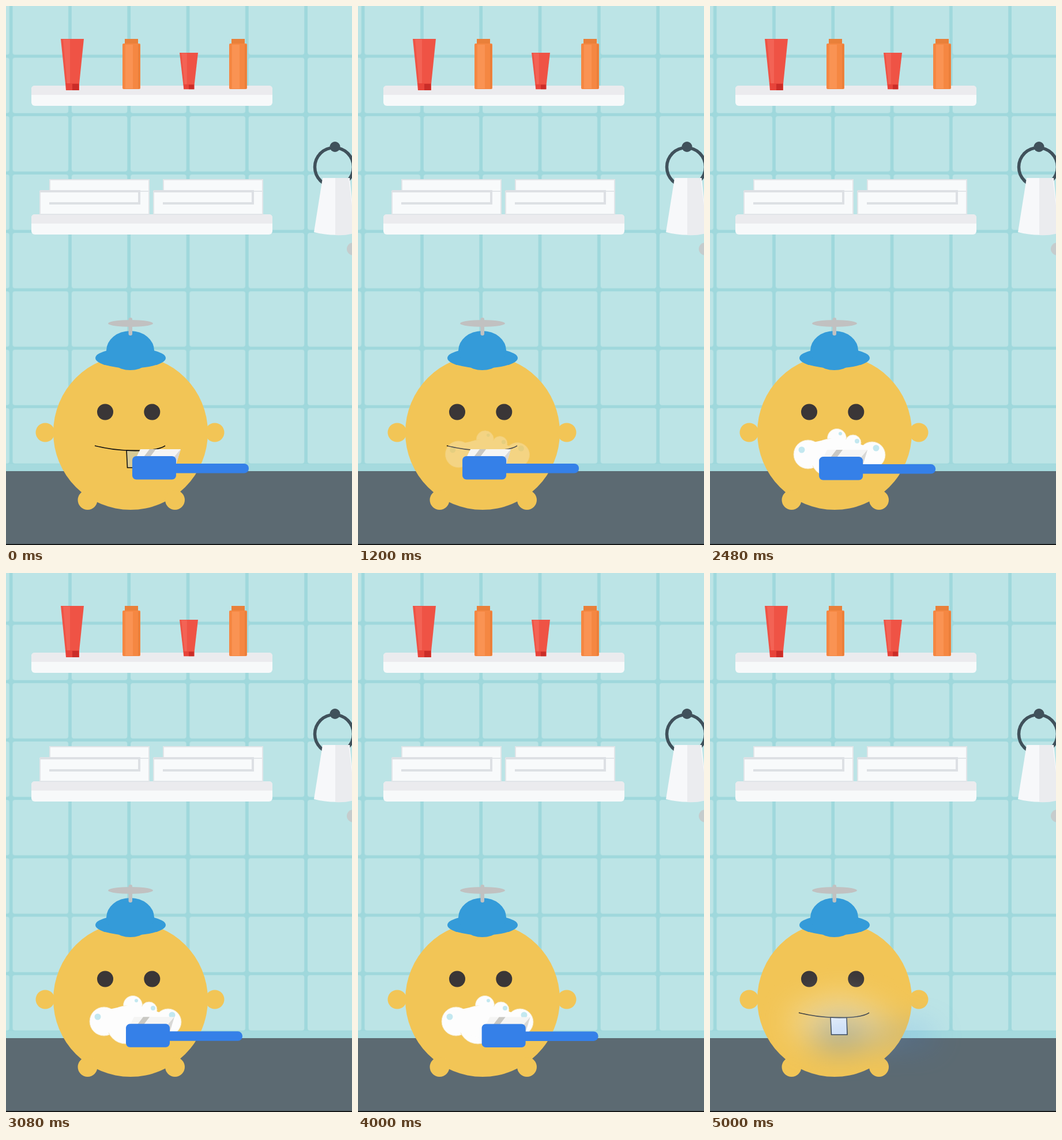
Recreate the animation shown at these times as an HTML page. Size 600 by 934 pixels, loop 5.04 s.

```html
<!DOCTYPE html>
<html lang="en">
<head>
<meta charset="utf-8">
<title>Brushing teeth</title>
<style>
  html, body { margin: 0; width: 100%; height: 100%; overflow: hidden; }
  svg { display: block; width: 600px; height: 934px; }
</style>
</head>
<body>
<svg viewBox="0 0 600 934">
  <defs>
    <pattern id="tiles" x="11.5" y="89.6" width="102.3" height="101.2" patternUnits="userSpaceOnUse">
      <rect width="103" height="102" fill="#9fd8dc"/>
      <rect width="96.6" height="96" rx="4" fill="#bce4e6"/>
    </pattern>
    <g id="shelf">
      <rect x="44" width="418" height="35" rx="6" fill="#f7f9fa"/>
      <path d="M44 16V6Q44 0 50 0H456Q462 0 462 6V16Z" fill="#ebebee"/>
    </g>
    <g id="bottle">
      <path d="M4 0H27V9H4Z" fill="#e9803a"/>
      <rect y="8" width="31" height="79" rx="2" fill="#f58742"/>
      <path d="M5 10H18V86H5Z" fill="#fa9353"/>
      <path d="M27 10H30V86H27Z" fill="#ea7f3a"/>
    </g>
    <g id="tube">
      <path d="M0 0H40L32 78H8Z" fill="#ef5345"/>
      <path d="M4 1H16V77H11Z" fill="#f36355"/>
      <path d="M8 77H32V89H9Z" fill="#e8443a"/>
      <path d="M20 78H31V89H20Z" fill="#cb2d28"/>
    </g>
    <g id="towels" stroke="#e1e5e8" stroke-width="2">
      <path d="M17 0H189V20H17Z" fill="#f8fafb"/>
      <path d="M0 20H189V60H0Z" fill="#f8fafb"/>
      <path d="M0 20H172V41H16" fill="none" stroke="#dde0e4" stroke-width="4"/>
    </g>
  </defs>

  <rect width="600" height="934" fill="url(#tiles)"/>
  <path d="M0 794H600V806H0Z" fill="#a5dade"/>
  <path d="M0 806H600V934H0Z" fill="#5c6a72"/>
  <path d="M0 932.5H600V934H0Z"/>

  <use href="#shelf" y="138"/>
  <use href="#shelf" y="361"/>
  <use href="#tube" x="95" y="57"/>
  <use href="#tube" transform="translate(301 81) scale(.8 .71)"/>
  <use href="#bottle" x="202" y="57"/>
  <use href="#bottle" x="387" y="57"/>
  <use href="#towels" x="59" y="301"/>
  <use href="#towels" x="256" y="301"/>

  <circle cx="569" cy="279" r="33.5" fill="none" stroke="#40515b" stroke-width="5.5"/>
  <circle cx="570.5" cy="244" r="9" fill="#40515b"/>
  <path d="M549 298H596L606 393Q570 401 534 392Z" fill="#f7f8fa"/>
  <path d="M571 298H594L606 393Q590 398 571 397Z" fill="#ebecef"/>
  <circle cx="602" cy="421" r="11" fill="#c5cccd"/>

  <g fill="#f2c556">
    <circle cx="216" cy="739" r="134"/>
    <circle cx="68" cy="739" r="16.5"/>
    <circle cx="362" cy="739" r="16.5"/>
    <circle cx="141.5" cy="856" r="17"/>
    <circle cx="293" cy="856" r="17"/>
  </g>
  <g fill="#349bd9">
    <ellipse cx="216" cy="610" rx="61" ry="17.5"/>
    <ellipse cx="215.5" cy="597" rx="41.5" ry="34"/>
  </g>
  <g fill="#c1c1c1">
    <ellipse cx="216" cy="550" rx="39" ry="6"/>
    <rect x="212.5" y="540" width="6.5" height="31" rx="3"/>
  </g>
  <g fill="#3a3637">
    <circle cx="172" cy="703.5" r="14"/>
    <circle cx="253.3" cy="703.5" r="14"/>
  </g>
  <g stroke="#111" stroke-width="1.6">
    <path id="tooth" d="M209 770L210.5 800H238L237 770.5Z"/>
    <path d="M154 762C178 768 200 770 216 770.5C240 771 264 770 276 762" fill="none"/>
  </g>

  <g id="gear">
    <g id="foam">
      <g fill="#fdfdfd" stroke="#f4e3b4">
        <circle cx="220" cy="749" r="16.5"/>
        <circle cx="248" cy="757" r="14"/>
        <circle cx="281" cy="778" r="23"/>
        <circle cx="170" cy="777" r="25"/>
        <circle cx="208" cy="783" r="33"/>
      </g>
      <path d="M170 758L212 749H230L250 756L280 766V798H240L208 805L172 795Z" fill="#fdfdfd"/>
      <g fill="#c3e8f0">
        <circle cx="159" cy="769" r="5.5"/>
        <circle cx="226" cy="741" r="3"/>
        <circle cx="255" cy="754" r="4"/>
        <circle cx="288" cy="766" r="5.5"/>
      </g>
    </g>
    <g id="brush">
      <path d="M7 2L14 -12H84L76 14Z" fill="#f5f5f4"/>
      <path d="M20 1L30 -12H41L31 1Z" fill="#c9c8c3"/>
      <path d="M72 2L84 -12L76 14Z" fill="#d8d8d6"/>
      <rect x="66" y="13" width="136" height="16.5" rx="8" fill="#3580e8"/>
      <rect width="76" height="40.5" rx="7" fill="#3580e8"/>
    </g>
  </g>
</svg>
<script>
  const LOOP = 5040;
  // Brush strokes: time, x, y
  const strokes = [
    [0, 219, 780], [720, 196, 782], [1200, 181, 780], [1920, 222, 781.5],
    [2620, 181, 781], [3320, 222, 781.5], [3700, 181, 781], [4040, 219, 781.5],
    [4500, 185, 781], [LOOP, 185, 781]
  ];
  const [tooth, gear, foam, brush] =
    ['tooth', 'gear', 'foam', 'brush'].map(id => document.getElementById(id));

  const progress = (t, from, to) => Math.min(1, Math.max(0, (t - from) / (to - from)));

  function brushAt(t) {
    const i = strokes.findIndex(s => s[0] > t);
    const [t0, x0, y0] = strokes[i - 1], [t1, x1, y1] = strokes[i];
    const p = progress(t, t0, t1);
    return [x0 + (x1 - x0) * p, y0 + (y1 - y0) * p];
  }

  function draw(now) {
    const t = now % LOOP;
    brush.setAttribute('transform', `translate(${brushAt(t)})`);

    const grow = progress(t, 1110, 1450);
    const scale = .89 + .11 * grow;
    foam.setAttribute('opacity', grow);
    foam.setAttribute('transform', `translate(224 774) scale(${scale}) translate(-224 -774)`);
    tooth.setAttribute('fill', t < 2000 ? '#d8ca94' : '#fff');

    const fade = progress(t, 4520, 5000);
    gear.style.filter = fade ? `blur(${28 * fade}px)` : 'none';
    gear.style.opacity = 1 - .5 * fade;
    requestAnimationFrame(draw);
  }
  requestAnimationFrame(draw);
</script>
</body>
</html>
```
